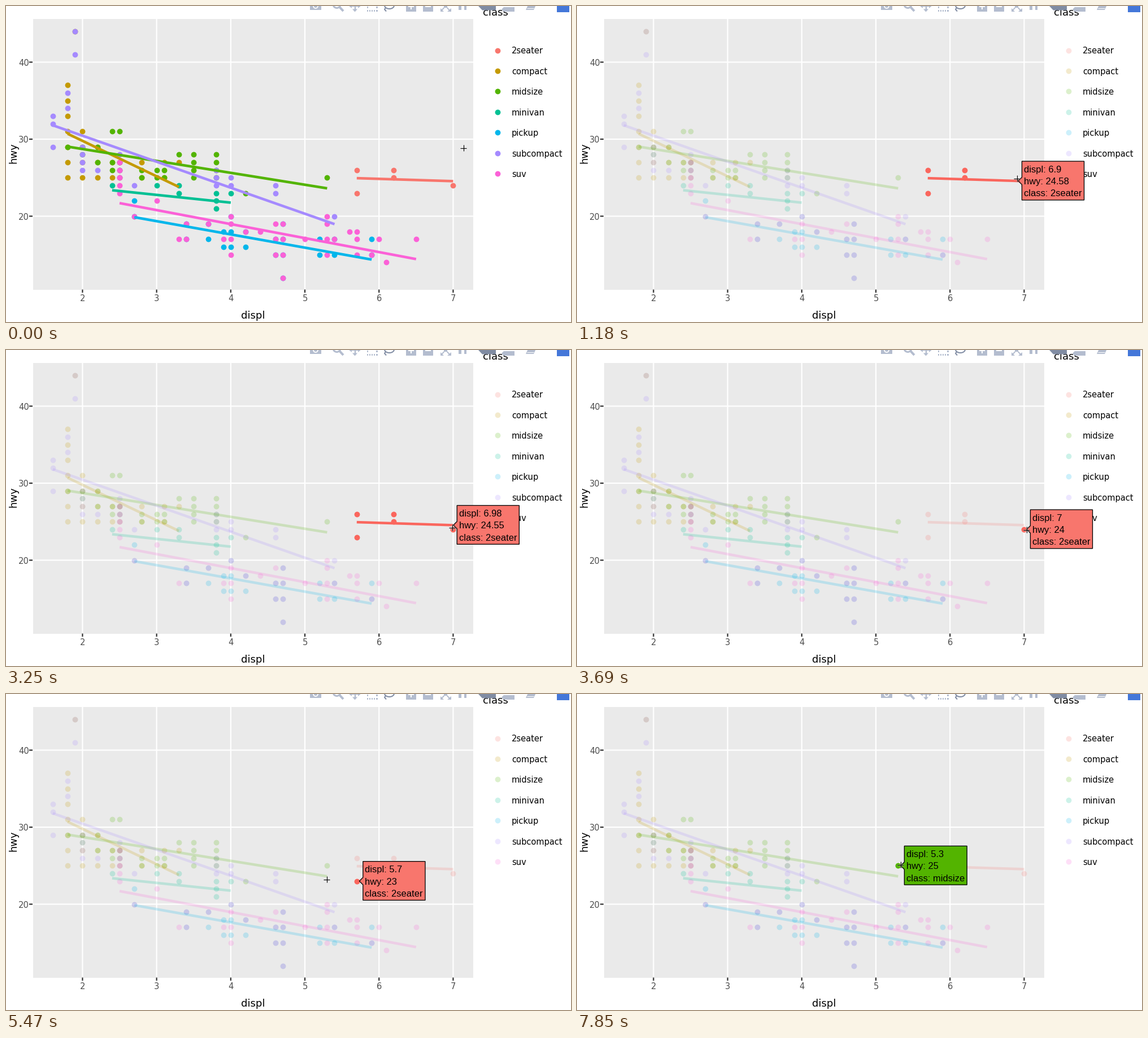
A matplotlib script that plays this animation: 1000x560 px, repeating every 8000 ms.

```python
from itertools import product

import numpy as np
import matplotlib.pyplot as plt
from matplotlib.animation import FuncAnimation
from matplotlib.patches import Rectangle, Polygon, Circle

W, H, DPI = 1000, 560, 100
LOOP, STEP = 8000, 50
PT = 72 / DPI

fig = plt.figure(figsize=(W / DPI, H / DPI), dpi=DPI, facecolor="white")
ax = fig.add_axes([0, 0, 1, 1])
ax.set(xlim=(0, W), ylim=(H, 0))
ax.axis("off")


def px(displ):
    return 135.4 + (np.asarray(displ) - 2) * 131.2


def py(hwy):
    return 372.5 - (np.asarray(hwy) - 20) * 13.65


def stroke(xs, ys, color, width, z, **kw):
    return ax.plot(xs, ys, color=color, lw=width * PT, zorder=z,
                   solid_capstyle="butt", **kw)[0]


def label(x, y, s, size, color="black", z=3, font="DejaVu Sans", **kw):
    kw.setdefault("va", "baseline")
    return ax.text(x, y, s, fontsize=size * PT, color=color, zorder=z,
                   family=font, **kw)


def dots(xs, ys, color, z):
    return ax.scatter(xs, ys, s=(9.8 * PT) ** 2, color=color, linewidths=0, zorder=z)


# Panel, grid and axes
ax.add_patch(Rectangle((48, 23), 779, 479.5, fc="#EAEAEA", lw=0, zorder=0))
for d in range(2, 8):
    stroke([px(d)] * 2, [23, 502.5], "white", 2.2, 1, snap=False)
    stroke([px(d)] * 2, [502.5, 508], "#333333", 2.2, 1, snap=False)
    label(px(d), 523.3, str(d), 14.8, "#4D4D4D", ha="center")
for h in (20, 30, 40):
    stroke([48, 827], [py(h)] * 2, "white", 2.2, 1, snap=False)
    stroke([41, 47], [py(h)] * 2, "#333333", 2.2, 1, snap=False)
    label(41, py(h) + 6.3, str(h), 14.8, "#4D4D4D", ha="right")
label(437, 553.5, "displ", 18, ha="center")
label(13, 260.5, "hwy", 18, ha="center", va="center", rotation=90)
label(844, 17.2, "class", 18)

# Car groups
groups = {}


def fan(sizes, low, high, bend, gap=1):
    """Columns of cars between two curves that run from the first to the last size."""
    cars = []
    for d in sizes:
        q = ((sizes[-1] - d) / (sizes[-1] - sizes[0])) ** bend
        lo, hi = (end + (start - end) * q for start, end in (low, high))
        cars += product([d], np.arange(round(lo), hi + 0.5, gap))
    return cars


def block_of(sizes, *hwys):
    return list(product(sizes, hwys))


def group(name, color, ends, cars, strong=None):
    n = len(groups)
    xs, ys = np.array(sorted(set(cars)), float).T
    d0, h0, d1, h1 = ends
    seg = px([d0, d1]), py([h0, h1])
    key_y = 78.5 + 36.45 * n
    label(895, key_y + 6, name, 14.6)
    groups[name] = dict(
        color=color, ends=ends, xs=xs, ys=ys, seg=seg, strong=strong or color,
        base=[dots(px(xs), py(ys), color, 4 + n * 0.1),
              stroke(*seg, color, 4.6, 5 + n * 0.1),
              dots([870.2], [key_y], color, 4)])


group("2seater", "#F8766D", (5.7, 24.938, 7, 24.548),
      block_of([5.7], 23, 26) + block_of([6.2], 25, 26) + [(7, 24)],
      strong="#FA665D")
group("compact", "#C49A00", (1.8, 30.7, 3.3, 23.8),
      fan([1.8, 2, 2.2, 2.4, 2.5, 2.8, 3.1], (25, 25), (37, 27), 4, gap=2)
      + [(1.9, 44), (3.3, 27)])
group("midsize", "#53B400", (1.8, 29.03, 5.3, 23.62),
      fan([1.8, 2, 2.2, 2.4, 2.5, 2.8, 3, 3.1, 3.5, 3.8], (29, 25), (29, 26), 4)
      + block_of([2, 2.2], 29) + block_of([2.4, 2.5], 31)
      + block_of([3.5, 3.8], 27, 28) + [(3.3, 28), (4.2, 23), (5.3, 25)])
group("minivan", "#00C094", (2.4, 23.37, 4, 21.76),
      fan([2.4, 3, 3.3, 3.8], (24, 21), (24, 23), 0.3) + [(4, 23)])
group("pickup", "#00B6EB", (2.7, 19.87, 5.9, 14.37),
      fan([2.7, 3.4, 3.7, 3.9, 4, 4.2, 4.6, 4.7, 5.2, 5.4, 5.9],
          (20, 15), (22, 17), 3, gap=2)
      + [(4, 20), (4.7, 12), (4.7, 19)])
group("subcompact", "#A58AFF", (1.6, 31.8, 5.4, 18.97),
      fan([2, 2.5, 3.8, 4, 4.6, 5.4], (26, 20), (29, 20), 0.6)
      + block_of([1.6], 29, 32, 33) + block_of([1.8], 34, 36)
      + block_of([1.9], 41, 44) + [(2.2, 26), (2.7, 24)])
group("suv", "#FB61D7", (2.5, 21.7, 6.5, 14.43),
      fan([4, 4.6, 4.7, 5.3, 5.7], (15, 15), (19, 18), 0.3, gap=2)
      + block_of([2.5], *range(23, 28))
      + block_of([3.3, 3.4, 3.9, 5, 5.4, 6, 6.5], 17)
      + block_of([4.2, 4.4, 5.6, 5.7], 18) + block_of([3.4, 3.7], 19)
      + [(2.7, 20), (3, 22), (4, 20), (4.7, 12), (5.3, 20), (5.9, 15), (6.1, 14)])

# Toolbar, cut off by the top edge
PALE, DARK = "#B4BDCF", "#808CA3"


def block(x, y, w, h, color=PALE, z=6):
    ax.add_patch(Rectangle((x, y), w, h, fc=color, lw=0, zorder=z))


def shape(points, color=PALE):
    ax.add_patch(Polygon(points, fc=color, lw=0, zorder=6))


def ring(x, y, r, color, width):
    ax.add_patch(Circle((x, y), r, fill=False, ec=color, lw=width * PT, zorder=6))


block(538, -6, 20, 13)
ring(548, 0, 4, "white", 1.8)
ring(585.5, -3, 6.5, PALE, 3)
stroke([590, 597], [1.5, 9], PALE, 4, 6)
stroke([608, 627], [0, 0], PALE, 2.5, 6)
stroke([617.5] * 2, [-5, 7], PALE, 2.5, 6)
shape([(613, 5.5), (622, 5.5), (617.5, 10.5)])
for s in (-1, 1):
    shape([(617.5 + 5.5 * s, -4), (617.5 + 5.5 * s, 4), (617.5 + 10 * s, 0)])
for k in range(5):
    block(638.5 + 4.1 * k, 7, 2.6, 2.5)
for x in (638.5, 655):
    block(x, 1, 2.5, 2.6)
a = np.linspace(-0.5, 3.7, 30)
stroke(678.5 + 8.5 * np.cos(a), -1 + 6 * np.sin(a), DARK, 2, 6)
stroke([672, 670, 673], [3, 6, 9.5], DARK, 2, 6)
for x in (708, 738):
    block(x, -9, 18, 18.5)
    block(x + 4, -1, 10, 2.5, "white", 7)
block(715.7, -5, 2.6, 10.5, "white", 7)
for x, s in ((768.5, 1), (787.5, -1)):
    shape([(x, 3.5), (x, 10), (x + 6.5 * s, 10)])
    stroke([x + 2 * s, x + 7 * s], [8, 3], PALE, 2, 6)
block(775, -3, 6, 6)
shape([(798, 0), (808, -9), (818, 0)])
for x in (801, 810.5):
    block(x, 0, 4.5, 7)
shape([(836, 0), (843, 7.5), (867, 7.5), (867, -7), (843, -7)], DARK)
block(879, -9, 18, 8)
block(881, 2, 19, 8)
shape([(877, 6), (881, 2), (881, 10)])
shape([(920, 7), (925, -4), (939, -4), (934, 7)])
stroke([922, 934], [4, 4], "white", 1, 7)
block(974.5, -11, 22, 22, "#4477D9")

# Highlight, tooltip and cursor
hot_dots = dots([0], [0], "red", 8)
hot_line = stroke([], [], "red", 4.4, 9)
bubble = ax.add_patch(Polygon([(0, 0)] * 3, ec="black", lw=1.3 * PT, zorder=10))
lines = [label(0, 0, "", 16.5, z=11, font="Liberation Sans") for _ in range(3)]
halo = [stroke([], [], "white", 2.6, 12, alpha=0.5) for _ in range(2)]
cross = [stroke([], [], "black", 1.2, 13) for _ in range(2)]


def smooth(p):
    return p * p * (3 - 2 * p)


def gather(p):
    return p ** 1.5


# Cursor moves: first change, last change, steps, start, goal, easing
MOVES = [
    (140, 1180, 8, (809, 251), (778, 305), smooth),
    (1320, 1320, 1, (778, 305), (777, 306), smooth),
    (2670, 3690, 8, (777, 306), (795, 318), smooth),
    (4440, 5470, 8, (795, 318), (567, 328), gather),
    (5620, 5620, 1, (567, 328), (566, 326), smooth),
    (6970, 7850, 7, (566, 326), (572, 302), smooth),
]
# Hover changes: time, group, displ (None follows the cursor), hwy (None is the line)
HOVERS = [
    (1040, "2seater", 6.9013, None),
    (1620, "2seater", 6.8848, None),
    (2820, "2seater", None, None),
    (3400, "2seater", 7, 24),
    (5320, "2seater", 5.7, 23),
    (5620, "midsize", 5.3, None),
    (7550, "midsize", 5.3, 25),
]


def cursor_at(t):
    pos = np.array(MOVES[0][3], float)
    for t0, t1, n, start, goal, ease in MOVES:
        if t < t0:
            break
        done = np.sum(np.linspace(t0, t1, n) <= t)
        start, goal = np.array(start), np.array(goal)
        pos = start + (goal - start) * ease(done / n)
    return pos + 0.5


def show_hover(name, d, h, cursor_x):
    g = groups[name]
    d0, h0, d1, h1 = g["ends"]
    on_line = h is None
    if d is None:
        gap = (d1 - d0) / 79
        d = min(d1, d0 + gap * round((2 + (cursor_x - px(2)) / 131.2 - d0) / gap))
    if on_line:
        h = h0 + (h1 - h0) * (d - d0) / (d1 - d0)
        hot_dots.set_offsets(np.column_stack([px(g["xs"]), py(g["ys"])]))
        hot_line.set_data(*g["seg"])
    else:
        hot_dots.set_offsets([(px(d), py(h))])
    hot_line.set_visible(on_line)
    hot_dots.set_color(g["strong"])
    hot_line.set_color(g["strong"])

    x, y = px(d) + (9 if on_line else 11), py(h)
    words = (f"displ: {round(float(d), 2):g}", f"hwy: {round(float(h), 2):g}",
             f"class: {name}")
    for k, (line, s) in enumerate(zip(lines, words)):
        line.set_text(s)
        line.set_position((x + 3.5, y - 15.2 + 21.3 * k))
    right = x + 7.6 + max(line.get_window_extent().width for line in lines)
    top, low = y - 34.9, y + 33.9
    bubble.set_xy([(x - 6.5, y), (x, y - 6.5), (x, top), (right, top),
                   (right, low), (x, low), (x, y + 6.5)])
    bubble.set_facecolor(g["color"])


def update(i):
    t = i * STEP + 40
    x, y = cursor_at(t)
    for pair in (halo, cross):
        pair[0].set_data([x - 5.5, x + 5.5], [y, y])
        pair[1].set_data([x, x], [y - 5.5, y + 5.5])

    past = [hover for hover in HOVERS if hover[0] <= t]
    for g in groups.values():
        for art in g["base"]:
            art.set_alpha(0.2 if past else 1)
    for art in (hot_dots, hot_line, bubble, *lines):
        art.set_visible(bool(past))
    if past:
        show_hover(*past[-1][1:], x)
    return []


anim = FuncAnimation(fig, update, frames=LOOP // STEP, interval=STEP,
                     init_func=lambda: update(0), repeat=True, repeat_delay=0)
plt.show()
```
